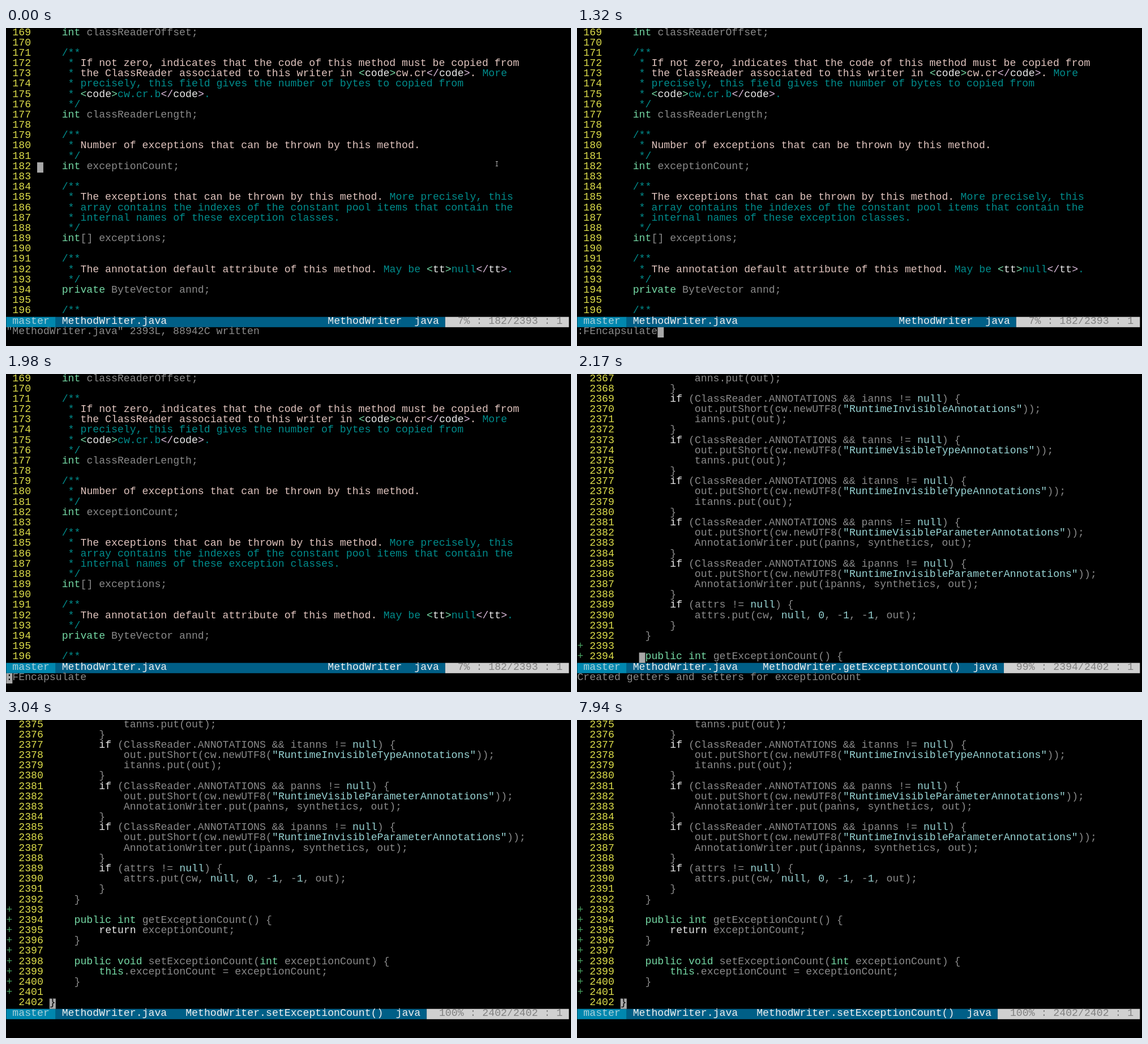
An HTML page with a canvas that plays this animation: 998 by 561 pixels, repeating every 9930 ms.

```html
<!DOCTYPE html>
<html lang="en">
<head>
<meta charset="utf-8">
<title>Encapsulate field</title>
<style>
html, body { margin: 0; width: 100%; height: 100%; overflow: hidden; background: #000; }
canvas { display: block; }
</style>
</head>
<body>
<canvas id="screen" width="998" height="561"></canvas>
<script>
const ctx = document.getElementById('screen').getContext('2d');
const LOOP = 9930, CW = 10.922, RH = 18.18, X0 = 0.4, Y0 = 0.6, COLS = 91;
const C = {
  text: '#8a8a8a', number: '#dcdc4a', comment: '#008c8c', title: '#e0c4be',
  type: '#74d8a4', keyword: '#e8e8e8', literal: '#98d4d4', endTag: '#dcbcdc',
  added: '#48a060', changed: '#c05828', cursor: '#a8a8a8',
  branch: '#0087af', bar: '#005f87', info: '#d0d0d0'
};

const head = `    int classReaderOffset;

    /**
     * If not zero, indicates that the code of this method must be copied from
     * the ClassReader associated to this writer in <code>cw.cr</code>. More
     * precisely, this field gives the number of bytes to copied from
     * <code>cw.cr.b</code>.
     */
    int classReaderLength;

    /**
     * Number of exceptions that can be thrown by this method.
     */
    int exceptionCount;

    /**
     * The exceptions that can be thrown by this method. More precisely, this
     * array contains the indexes of the constant pool items that contain the
     * internal names of these exception classes.
     */
    int[] exceptions;

    /**
     * The annotation default attribute of this method. May be <tt>null</tt>.
     */
    private ByteVector annd;

    /**`.split('\n');

const block = (name, kind, put = `${name}.put(out)`) =>
`        if (ClassReader.ANNOTATIONS && ${name} != null) {
            out.putShort(cw.newUTF8("Runtime${kind}Annotations"));
            ${put};
        }
`;
const paramBlock = (name, kind) =>
  block(name, kind + 'Parameter', `AnnotationWriter.put(${name}, synthetics, out)`);

const tail = (`            anns.put(out);
        }
` + block('ianns', 'Invisible') + block('tanns', 'VisibleType') + block('itanns', 'InvisibleType') +
paramBlock('panns', 'Visible') + paramBlock('ipanns', 'Invisible') +
`        if (attrs != null) {
            attrs.put(cw, null, 0, -1, -1, out);
        }
    }

    public int getExceptionCount() {
        return exceptionCount;
    }

    public void setExceptionCount(int exceptionCount) {
        this.exceptionCount = exceptionCount;
    }

}`).split('\n');

const privateHead = head.map(line => line.replace('int exceptionCount', 'private int exceptionCount'));
const added = n => n > 2392 && n < 2402 ? '+' : '';

const views = {
  start: { lines: head, first: 169, origin: 5, scope: 'MethodWriter', info: '7% : 182/2393 : 1' },
  created: { lines: tail.slice(0, 28), first: 2367, origin: 7, sign: added,
    scope: 'MethodWriter.getExceptionCount()', info: '99% : 2394/2402 : 1' },
  end: { lines: tail.slice(8), first: 2375, origin: 7, sign: added,
    scope: 'MethodWriter.setExceptionCount()', info: '100% : 2402/2402 : 1' },
  field: { lines: privateHead, first: 169, origin: 7, sign: n => n === 182 ? '~' : '',
    scope: 'MethodWriter', info: '7% : 182/2402 : 5' }
};

// Each step: start time, view, message line, cursor [col, row, character, colour]
const steps = [
  [0, 'start', '"MethodWriter.java" 2393L, 88942C written', [5, 13]],
  [840, 'start', '"MethodWriter.java" 2393L, 88942C written'],
  [890, 'start', ':', [1, 29]],
  [1170, 'start', ':F', [2, 29]],
  [1320, 'start', ':FEncapsulate', [13, 29]],
  [1980, 'start', ':FEncapsulate', [0, 29, ':']],
  [2020, 'start', ':FEncapsulate'],
  [2170, 'created', 'Created getters and setters for exceptionCount', [10, 27]],
  [3040, 'end', '', [7, 27, '}']],
  [5070, 'field', '', [11, 13, 'p', C.type]],
  [7940, 'end', '', [7, 27, '}']]
];

function write(text, col, row, color) {
  ctx.fillStyle = color;
  ctx.fillText(text, X0 + col * CW, Y0 + row * RH + 11.9);
  return col + text.length;
}

function cells(col, row, count, color) {
  ctx.fillStyle = color;
  ctx.fillRect(X0 + col * CW, Y0 + row * RH, count * CW, RH);
}

function writeCode(line, col, row) {
  const token = /("[^"]*"|\b(?:public|private|int|void|this|if|return|null|\d+)\b)/;
  for (const part of line.split(token)) {
    const color = /^("|null$|\d+$)/.test(part) ? C.literal
      : /^(if|return)$/.test(part) ? C.keyword
      : token.test(part) ? C.type : C.text;
    col = write(part, col, row, color);
  }
}

function writeDoc(text, col, row, color) {
  for (const part of text.split(/(<\/?\w+>)/)) {
    const tag = part.match(/^(<\/?)(\w+)>$/);
    if (!tag) { col = write(part, col, row, color); continue; }
    const edge = tag[1] === '<' ? C.type : C.endTag;
    col = write(tag[1], col, row, edge);
    col = write(tag[2], col, row, C.keyword);
    col = write('>', col, row, edge);
  }
  return col;
}

function drawLines({ lines, first, origin, sign }) {
  let inTitle = false;
  lines.forEach((line, row) => {
    const n = first + row;
    const mark = sign ? sign(n) : '';
    write(mark, 0, row, mark === '~' ? C.changed : C.added);
    write(String(n), origin - 1 - String(n).length, row, C.number);
    const doc = line.match(/^( *(?:\/\*\*|\*\/|\* ?))(.*)/);
    if (!doc) return writeCode(line, origin, row);
    let col = write(doc[1], origin, row, C.comment);
    let rest = doc[2];
    if (doc[1].endsWith('/**')) inTitle = true;
    else if (inTitle) {
      // The summary runs up to the first full stop
      const stop = rest.search(/\.(\s|$)/);
      const end = stop < 0 ? rest.length : stop + 1;
      col = writeDoc(rest.slice(0, end), col, row, C.title);
      rest = rest.slice(end);
      inTitle = stop < 0;
    }
    writeDoc(rest, col, row, C.comment);
  });
}

function drawStatus({ scope, info }) {
  const infoCol = COLS - info.length - 3;
  cells(0, 28, 8, C.branch);
  cells(8, 28, infoCol - 8, C.bar);
  cells(infoCol, 28, info.length + 3, C.info);
  write('master', 1, 28, '#a8d0da');
  write('MethodWriter.java', 9, 28, '#f0f0f0');
  write(scope, infoCol - 7 - scope.length, 28, '#f0f0f0');
  write('java', infoCol - 5, 28, '#f0f0f0');
  write(info, infoCol + 2, 28, '#808080');
}

function drawPointer() {
  ctx.fillStyle = '#b0b0b0';
  ctx.fillRect(865, 235, 4, 1);
  ctx.fillRect(866.5, 235, 1, 9);
  ctx.fillRect(865, 243, 4, 1);
}

function draw(t) {
  const [, name, message, cursor] = steps.findLast(step => step[0] <= t);
  ctx.fillStyle = '#000';
  ctx.fillRect(0, 0, 998, 561);
  ctx.font = '18.2px "Liberation Mono", monospace';
  drawLines(views[name]);
  drawStatus(views[name]);
  write(message, 0, 29, C.text);
  if (cursor) {
    const [col, row, char = '', color = C.cursor] = cursor;
    cells(col, row, 1, color);
    write(char, col, row, '#000');
  }
  if (t < 840) drawPointer();
}

const begin = performance.now();
function tick() {
  draw((performance.now() - begin) % LOOP);
  requestAnimationFrame(tick);
}
tick();
</script>
</body>
</html>
```
